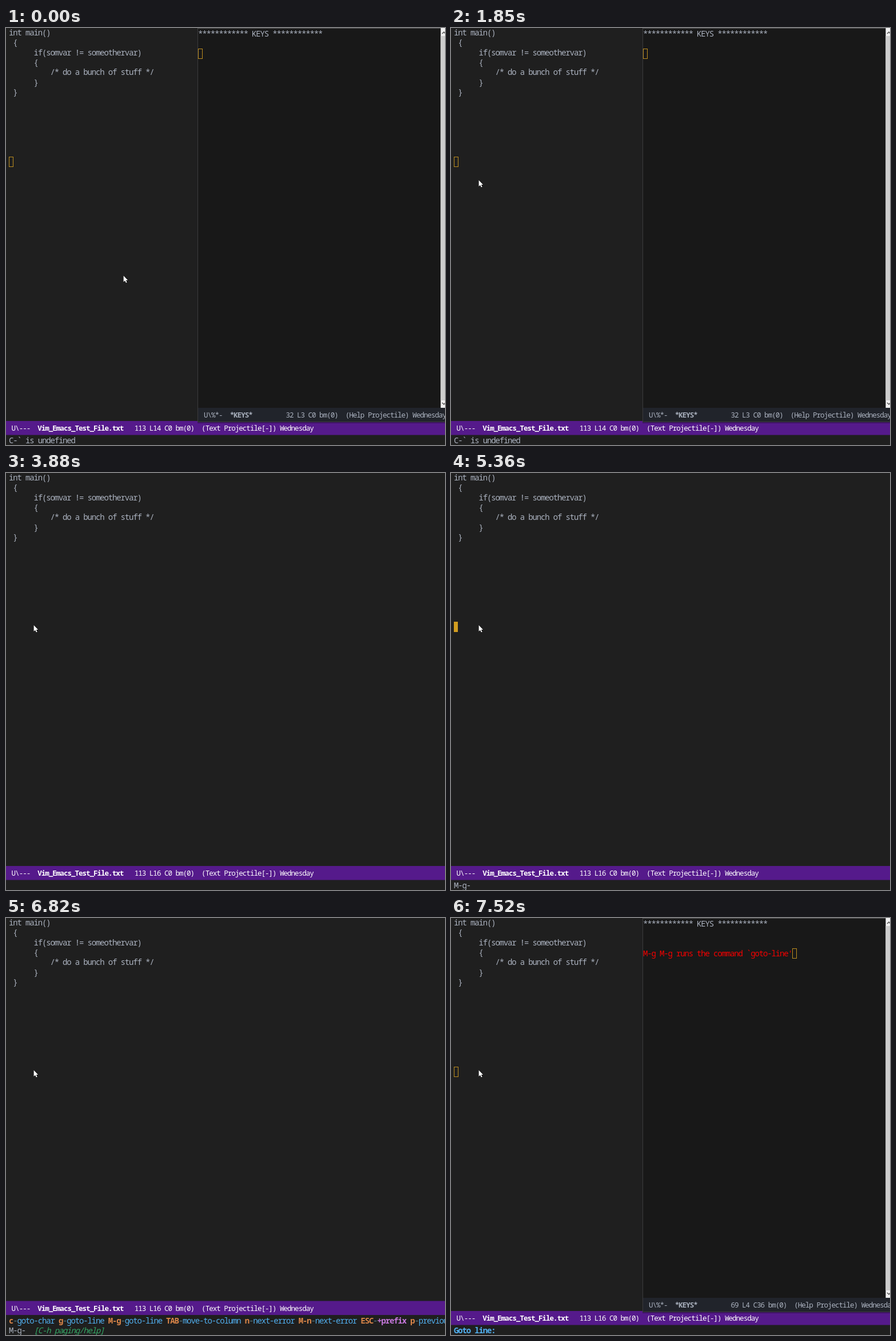
These frames come from a looping animation (768 px wide and 729 px high, 7.99 s). An HTML page with a canvas:

```html
<!DOCTYPE html>
<html lang="en">
<head>
<meta charset="utf-8">
<title>Editor key log</title>
<style>
html, body { margin: 0; width: 100%; height: 100%; overflow: hidden; background: #1f1f1f; }
canvas { display: block; }
</style>
</head>
<body>
<canvas id="stage" width="768" height="729"></canvas>
<script>
const ctx = document.getElementById('stage').getContext('2d');
const LOOP = 7990, PITCH = 7.24, LINE = 17.33;
const FG = '#abb2bf', GOLD = '#d29d20', BLUE = '#51afef', ORANGE = '#da8548';
const FAMILY = '"Noto Sans Mono", "DejaVu Sans Mono", monospace';
const CODE = [
  'int main()', ' {', '      if(somvar != someothervar)', '      {',
  '          /* do a bunch of stuff */', '      }', ' }'
];
const HINTS = [
  ['c', 'goto-char'], ['g', 'goto-line'], ['M-g', 'goto-line'], ['TAB', 'move-to-column'],
  ['n', 'next-error'], ['M-n', 'next-error'], ['ESC', '+prefix'], ['p', 'previous-error']
];
const BLINKS = [2870, 3330, 3880, 4340, 4890, 5360, 5810, 6370, 6820];

function rect(x, y, w, h, color) {
  ctx.fillStyle = color;
  ctx.fillRect(x, y, w, h);
}

// Draws text on a fixed character grid and returns the x after it.
function text(str, x, y, color = FG, style = '', size = 14, pitch = PITCH) {
  ctx.font = `${style} semi-condensed ${size}px ${FAMILY}`;
  ctx.letterSpacing = '0px';
  ctx.letterSpacing = pitch - ctx.measureText('0').width + 'px';
  ctx.fillStyle = color;
  ctx.fillText(str, x, Math.round(y));
  return x + str.length * pitch;
}

function modeText(x, y, color, parts) {
  parts.forEach((part, i) => {
    x = text(part, x, y, color, i === 1 ? 'bold' : '', 12.6, 6.52);
  });
}

function hollow(x, y) {
  ctx.strokeStyle = '#bd8d1f';
  ctx.lineWidth = 1;
  ctx.strokeRect(x + .5, y + .5, 7, 17);
}

function chevron(y, dir) {
  ctx.beginPath();
  ctx.moveTo(763, y + 2 * dir);
  ctx.lineTo(766, y - dir);
  ctx.lineTo(769, y + 2 * dir);
  ctx.strokeStyle = '#505050';
  ctx.lineWidth = 1.5;
  ctx.stroke();
}

function modeLine(y, line) {
  rect(0, y, 768, 24.5, '#551a8b');
  modeText(9.6, y + 17, '#fff', ['U\\---  ', 'Vim_Emacs_Test_File.txt',
    `   113 L${line} C0 bm(0)  (Text Projectile[-]) Wednesday`]);
}

function keysFrame(logged) {
  rect(335, 689, 433, 2, 'rgba(0,0,0,.3)');
  rect(335, 0, 433, 689, '#3b3b3d');
  rect(335, 0, 433, 1, '#555557');
  rect(336, 1, 424.5, 663, '#181818');
  text('************ KEYS ************', 336, 14.5);
  if (logged) {
    text("M-g M-g runs the command `goto-line'", 336, 66.5, '#f40000');
    hollow(597, 53);
  } else {
    hollow(336, 36);
  }
  rect(760.5, 0, 8, 664, '#f0f0f0');
  rect(760.5, 14, 8, 637, '#cdcdcd');
  chevron(8, 1);
  chevron(657, -1);
  rect(336, 664, 432, 24, '#21242b');
  modeText(346, 681, FG, ['U\\%*-  ', '*KEYS*',
    `         ${logged ? '69 L4 C36' : '32 L3 C0'} bm(0)  (Help Projectile) Wednesday`]);
}

function hints() {
  let x = 5;
  for (const [key, name] of HINTS) {
    const prefix = name[0] === '+';
    x = text(key, x, 709, ORANGE, 'bold');
    x = text('-', x, 709, '#5f8084');
    x = text(name, x, 709, prefix ? '#c678dd' : BLUE, prefix ? 'bold' : '') + PITCH;
  }
  text('[C-h paging/help]', 5 + 6 * PITCH, 726, '#34a766', 'italic');
}

function steps(t, start, end, count) {
  const k = Math.floor((t - start) / (end - start) * (count - 1) + 1.001);
  return Math.max(0, Math.min(count, k)) / count;
}

function pointerAt(t) {
  if (t < 1600) {
    const p = steps(t, 500, 1160, 9), e = p * p * (3 - 2 * p);
    return [205 - 111 * e, 432 - 174 * e];
  }
  const p = steps(t, 1610, 1850, 4), q = 1 - p;
  const curve = (a, b, c) => q * q * a + 2 * p * q * b + p * p * c;
  return [curve(94, 64, 48), curve(258, 255, 265)];
}

function pointer(t) {
  const [x, y] = pointerAt(t).map(Math.round);
  if (t >= 2240 && t < 2400) {
    ctx.beginPath();
    ctx.arc(x, y, 9, 0, 7);
    ctx.fillStyle = 'rgba(255,255,0,.47)';
    ctx.fill();
  }
  const arrow = new Path2D(`M${x + .6} ${y + 1}v11l2.5-2.3 1.8 3.9 1.8-.8-1.8-3.8h3.2z`);
  ctx.strokeStyle = '#000';
  ctx.lineWidth = 1;
  ctx.stroke(arrow);
  ctx.fillStyle = '#fff';
  ctx.fill(arrow);
}

function draw(t) {
  const clicked = t >= 2240, hinting = t >= 5500 && t < 7050, prompting = t >= 7050;
  const keysShown = !clicked || t >= 6970;
  rect(0, 0, 768, 729, '#1f1f1f');
  CODE.forEach((line, i) => text(line, 5, 13 + i * LINE));

  if (keysShown) hollow(5, clicked ? 260 : 225);
  else if (BLINKS.filter(b => t >= b).length % 2 === 0) rect(5, 260, 7, 18, GOLD);

  modeLine(hinting ? 669.5 : 687, clicked ? 16 : 14);
  if (hinting) hints();
  if (!clicked) text('C-` is undefined', 5, 726);
  else if (prompting) {
    text('Goto line:', 5, 726, BLUE, 'bold');
    if (t < 7520) rect(85, 711, 7, 18, GOLD);
  } else if (t >= 4730) text('M-g-', 5, 726);

  if (keysShown) keysFrame(prompting);
  pointer(t);
}

const start = performance.now();
function tick() {
  draw((performance.now() - start) % LOOP);
  requestAnimationFrame(tick);
}
tick();
</script>
</body>
</html>
```
